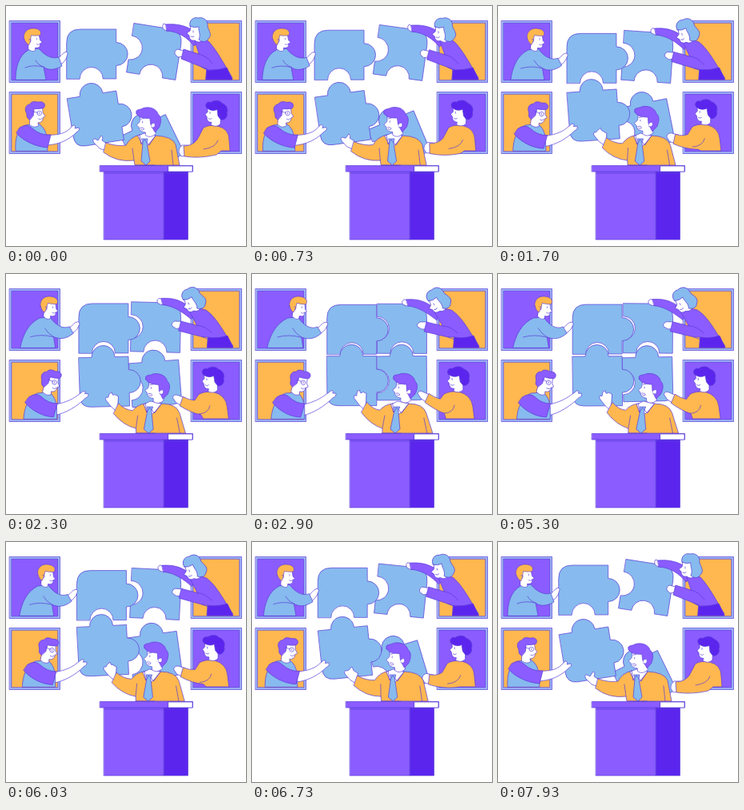
Animation, 300 px wide and 300 px high, one loop 8010 ms. Source, as an HTML page:

```html
<!DOCTYPE html>
<html lang="en">
<head>
<meta charset="utf-8">
<title>Puzzle teamwork</title>
<style>
  html, body { margin: 0; width: 100%; height: 100%; overflow: hidden; background: #fff; }
  svg { display: block; width: 100%; height: 100%; }
</style>
</head>
<body>
<svg id="stage" viewBox="0 0 300 300" stroke="#5a3dd8" stroke-width=".7" stroke-linejoin="round" stroke-linecap="round"></svg>
<script>
const LOOP = 8010, TRAVEL = 3150;
const PURPLE = '#8b5cff', DEEP = '#5c25ee', ORANGE = '#ffb74f', BLUE = '#87baee', WHITE = '#fff';
const stage = document.getElementById('stage');
const updates = [];

function add(tag, attrs, parent = stage) {
  const node = document.createElementNS('http://www.w3.org/2000/svg', tag);
  for (const key in attrs) node.setAttribute(key, attrs[key]);
  parent.appendChild(node);
  return node;
}

const lerp = (a, b, s) => a + (b - a) * s;

// Blends two path strings that share the same commands.
function mix(a, b, s) {
  const ends = b.match(/-?[\d.]+/g);
  let i = 0;
  return a.replace(/-?[\d.]+/g, n => lerp(+n, +ends[i++], s).toFixed(2));
}

function morph(fill, apart, joined) {
  const node = add('path', { fill });
  updates.push(s => node.setAttribute('d', mix(apart, joined, s)));
}

// Rigid group; poses are [x, y, degrees].
function rigid(apart, joined, shapes, scale = 1) {
  const group = add('g', {});
  for (const [fill, d] of shapes) add('path', { fill, d }, group);
  updates.push(s => {
    const [x, y, r] = apart.map((v, i) => lerp(v, joined[i], s));
    group.setAttribute('transform', `translate(${x} ${y}) rotate(${r}) scale(${scale})`);
  });
}

function box(x, y, width, height, fill, extra = {}) {
  add('rect', { x, y, width, height, fill, ...extra });
}

function windowFrame(x, y, fill) {
  box(x, y, 63, 77, '#9db8f3');
  box(x + 2.7, y + 2.7, 57.6, 71.6, fill);
}

windowFrame(4.5, 18.5, PURPLE);
windowFrame(231.5, 18.5, ORANGE);
windowFrame(4.5, 107.5, ORANGE);
windowFrame(231.5, 107.5, PURPLE);

// Puzzle pieces: knobs and sockets are half circles
const topKnob = 'H-15 A14.5 14.5 0 0 1 14 -31';
const rightKnob = 'V-14.5 A14.5 14.5 0 0 1 31 14.5';
const leftSocket = 'V15 A15 15 0 0 0 -31 -15';
const bottomSocket = 'H14.5 A14.5 14.5 0 0 0 -14.5 31';

rigid([185, 177, -26], [187.5, 133, 0],
  [[BLUE, `M-31 -31 ${topKnob} H31 V14 Q31 24 20 24 H-31 ${leftSocket} Z`]]);
rigid([186, 57, 9], [187.5, 68.5, 0],
  [[BLUE, `M-31 -31 H14 Q31 -31 31 -14 V31 ${bottomSocket} H-31 ${leftSocket} Z`]]);
rigid([106.7, 60, 0], [125, 69.5, 0],
  [[BLUE, `M-31 31 V-14 Q-31 -31 -14 -31 H31 ${rightKnob} V31 ${bottomSocket} Z`]]);
rigid([112, 141.5, -9], [125, 133.5, 0],
  [[BLUE, `M-31 -31 ${topKnob} H31 ${rightKnob} V31 H-17 Q-31 31 -31 17 Z`]]);

// Upper left person
morph(WHITE, 'M65 65 C69 63 70 60 73 58 Q77 56 77 60 L75 66 Q73 71 67 74 Z',
             'M81 68 C86 66 87 62 90 61 Q95 59 95 63 L92 69 Q88 74 84 75 Z');
morph(BLUE, 'M12 92 C12 76 16 62 28 55 L41 53 C47 61 57 67 66 64 L70 75 C60 81 51 80 47 76 L50 92 Z',
            'M19 92 C23 76 30 62 45 55 L58 54 C64 64 74 70 82 66 L87 74 C78 82 70 82 62 79 L64 92 Z');
morph('none', 'M24 77 Q34 73 46 76 M47 76 Q40 74 37 68', 'M32 79 Q45 75 61 79 M62 79 Q55 75 51 68');
rigid([34, 41, 0], [58.5, 41, 8], [
  [WHITE, 'M-7 -7 H8 L10 2 L13 5 L10 7 Q11 14 3 13 L3 17 Q-2 20 -7 15 Z'],
  [ORANGE, 'M-13 1 C-16 -8 -9 -16 1 -15 C9 -15 13 -10 10 -5 Q3 -4 -3 -5 L-4 3 L-6 9 Q-10 8 -13 1 Z'],
  ['none', 'M5 -1 V1 M5 8 Q8 10 10 7 M-6 1 Q-2 -1 -4 5']
], .86);

// Upper right person
morph(WHITE, 'M222 56 L214 54 Q210 56 211 60 L215 64 L222 63 Z',
             'M218 60 L210 60 Q205 63 207 66 L212 69 L218 69 Z');
morph(WHITE, 'M202 24 L197 22 Q195 24 196 28 L200 31 L204 31 Z',
             'M195 33 L190 32 Q186 34 188 38 L193 40 L197 40 Z');
morph(PURPLE, 'M200 23 C213 22 223 24 233 30 L244 43 L235 50 C227 40 216 32 201 31 Z',
              'M193 32 C207 31 215 34 224 40 L236 47 L231 58 C220 50 210 42 195 40 Z');
morph(PURPLE, 'M236 43 Q247 38 254 45 C264 56 274 75 283 90 L282 92 H250 L251 80 L244 76 L219 66 L222 54 L241 60 Z',
              'M228 47 Q239 42 249 45 C263 53 274 76 284 90 L283 92 H252 L253 79 L245 79 L215 72 L218 60 L238 65 Z');
morph(DEEP, 'M251 80 Q264 81 276 77 L283 92 H250 Z', 'M253 79 Q266 81 277 77 L284 92 H252 Z');
morph('none', 'M241 60 Q251 62 258 72 M244 76 L252 79', 'M238 65 Q248 65 257 74 M245 79 L253 82');
rigid([240, 31, 0], [232, 34, -30], [
  [WHITE, 'M-8 -10 H7 L7 10 Q2 17 -4 12 Q-11 13 -11 6 L-14 3 L-10 0 Z'],
  [BLUE, 'M-10 -6 C-12 -12 -6 -18 0 -16 C8 -18 13 -12 12 -5 C14 1 18 5 13 10 C9 16 4 13 1 11 C4 4 0 0 1 -5 Q-5 -3 -10 -6 Z'],
  ['none', 'M-6 0 V2 M-9 7 Q-7 9 -5 7']
]);

// Lower left person
morph(WHITE, 'M48 161 C62 162 73 160 79 154 L84 149 Q88 149 86 153 L91 152 Q93 155 88 158 C78 168 66 173 51 174 Z',
             'M60 164 C73 162 84 157 92 151 L99 146 Q103 145 101 149 L105 149 Q106 153 101 155 C91 165 77 174 64 177 Z');
morph(BLUE, 'M12 181 C11 166 14 154 24 149 L41 147 Q50 153 51 165 L52 181 Z',
            'M24 181 C25 167 31 154 42 149 L57 148 Q65 154 66 167 L66 181 Z');
morph(PURPLE, 'M17 152 Q26 146 33 153 Q43 162 56 161 L52 177 C36 176 21 168 13 159 Z',
              'M31 154 Q40 148 46 153 Q55 162 66 162 L61 179 C47 179 33 170 26 161 Z');
rigid([38, 133, 0], [61, 134, 14], [
  [WHITE, 'M-8 -7 H8 L9 1 L12 5 L9 7 Q9 14 2 14 L3 18 Q-3 22 -9 17 Z'],
  [PURPLE, 'M-9 10 C-15 7 -12 4 -14 0 C-17 -6 -13 -11 -9 -11 C-6 -17 1 -14 3 -14 C9 -16 14 -11 10 -6 Q3 -4 -3 -5 L-4 4 Z'],
  ['none', 'M1 1 a3 3 0 1 0 6 0 a3 3 0 1 0 -6 0 M1 0 L-5 -1 M3 9 Q6 11 8 8 M4 0 V2']
], .92);

// Lower right person
morph(WHITE, 'M228 174 L220 174 Q215 178 216 183 L219 188 L228 187 Z',
             'M223 151 L214 147 Q208 144 207 149 L211 155 L219 161 Z');
morph(ORANGE, 'M247 152 Q254 148 264 150 Q279 153 279 168 L280 181 H269 L263 186 Q242 191 223 188 L222 175 Q233 175 239 167 Z',
              'M240 150 Q247 146 258 147 Q274 151 276 166 L278 181 H242 L240 174 Q229 170 216 160 L221 149 Q228 154 235 156 Z');
morph('none', 'M265 168 Q262 177 247 179', 'M253 164 Q251 174 240 174');
rigid([262, 132.5, 0], [257, 130, -3], [
  [WHITE, 'M-10 -7 H7 L6 15 Q1 20 -6 16 L-5 13 Q-11 13 -11 6 L-13 3 L-10 0 Z'],
  [DEEP, 'M-11 -5 C-15 -10 -9 -14 -6 -12 C0 -16 6 -14 8 -11 C14 -9 16 -3 14 1 C16 6 10 12 6 9 L3 5 L2 -3 Q-5 0 -11 -5 Z'],
  ['none', 'M-7 0 V2 M-9 8 Q-6 10 -5 8 M3 2 Q7 0 5 6']
]);

// Presenter
morph(WHITE, 'M125 181 L117 178 L110 171 Q107 166 111 166 L115 168 L119 162 Q122 163 120 168 L126 172 Z',
             'M142 171 L134 163 L128 155 Q127 150 131 152 L132 146 Q135 145 135 151 L139 147 Q143 149 141 155 L147 163 Z');
morph(ORANGE, 'M125 171 Q139 176 150 174 Q155 164 167 161 L187 162 Q208 163 212 173 L217 199 H161 L160 193 Q139 196 122 183 Z',
              'M144 160 Q151 169 160 170 Q166 163 176 162 L196 162 Q214 162 218 174 L226 199 H163 L163 193 Q148 188 137 173 Z');
morph(WHITE, 'M165 162 L173 159 L187 162 L179 172 L176 176 L170 172 Z',
             'M174 163 L182 159 L196 162 L187 173 L182 176 L177 172 Z');
morph(BLUE, 'M170 166 L177 166 L176 171 L180 194 L175 199 L169 194 L171 171 Z',
            'M178 166 L185 166 L183 171 L185 194 L179 199 L173 194 L178 171 Z');
morph('none', 'M158 178 L160 193 M207 180 L209 199 M167 161 L169 173 L173 167 L179 174 L187 162',
              'M166 177 L163 193 M215 180 L219 199 M176 162 L177 173 L181 167 L187 174 L196 162');
rigid([178, 145, 0], [191, 142.5, 5], [
  [WHITE, 'M-11 -8 H8 L10 16 Q3 23 -4 18 L-4 14 Q-12 14 -13 7 L-16 4 L-12 0 Z'],
  [PURPLE, 'M-16 -11 C-19 -18 -11 -16 -7 -19 C4 -22 12 -16 13 -11 C19 -6 17 1 15 7 L9 14 L6 9 L3 3 L2 -5 C-5 -5 -12 -5 -16 -11 Z'],
  [WHITE, 'M4 3 Q9 -1 9 5 Q8 9 4 7'],
  ['none', 'M-8 -1 V1 M-10 -4 L-6 -5 M-11 8 Q-6 7 -6 10 Q-8 12 -10 10']
], .92);

// Podium
box(122.5, 207, 75, 85, PURPLE);
box(197.5, 207, 30, 85, DEEP);
box(117.5, 199.5, 116, 7.5, PURPLE);
box(203, 200, 30, 7, WHITE);
add('path', { fill: 'none', d: 'M123 209 H227 M162 199 H186' });

function frame() {
  const t = performance.now() % LOOP;
  const progress = Math.min(Math.min(t, LOOP - t) / TRAVEL, 1);
  const s = (1 - Math.cos(Math.PI * progress)) / 2;
  for (const update of updates) update(s);
  requestAnimationFrame(frame);
}
frame();
</script>
</body>
</html>
```
